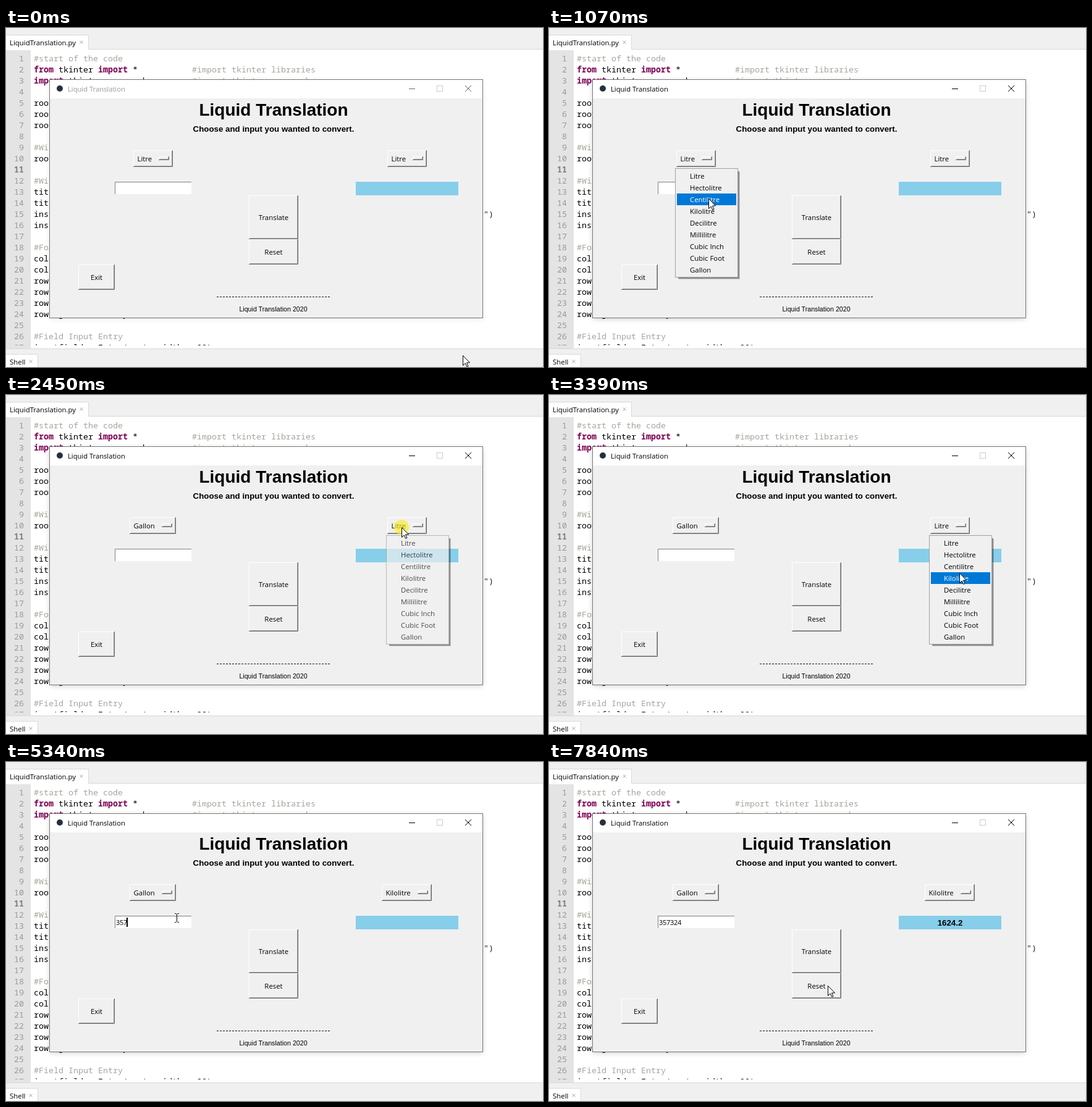
Animation of 869x549 px, one loop 8000 ms. Source, as an HTML page:

```html
<!DOCTYPE html>
<html lang="en">
<head>
<meta charset="utf-8">
<title>Liquid Translation</title>
<style>
  html, body { margin: 0; width: 100%; height: 100%; overflow: hidden; background: #f0f0f0; }
  svg { display: block; width: 100vw; height: 100vh; }
  text { white-space: pre; }
  .ui { font: 11.4px "Open Sans", "Noto Sans", sans-serif; }
  .code { font: 13.33px "Noto Sans Mono", "DejaVu Sans Mono", monospace; }
  .arial { font-family: "Liberation Sans", Arial, sans-serif; }
  .b { font-weight: 700; }
  .mid { text-anchor: middle; }
  .end { text-anchor: end; }
</style>
</head>
<body>
<svg id="stage" viewBox="0 0 869 549" xmlns="http://www.w3.org/2000/svg"></svg>
<script>
const LOOP = 8000, STEP = 77.5;
const UNITS = ["Litre", "Hectolitre", "Centilitre", "Kilolitre", "Decilitre",
  "Millilitre", "Cubic Inch", "Cubic Foot", "Gallon"];
const ROW = 19, ROW_TOP = 230;
const COMMENT = "#a6a69c";

const esc = s => s.replace(/&/g, "&amp;").replace(/</g, "&lt;");
const rect = (x, y, w, h, fill, more = "") =>
  `<rect x="${x}" y="${y}" width="${w}" height="${h}" fill="${fill}" ${more}/>`;
const text = (x, y, s, cls = "ui", fill = "#000", more = "") =>
  `<text x="${x}" y="${y}" class="${cls}" fill="${fill}" ${more}>${esc(s)}</text>`;
const line = (d, stroke, w = 1, more = "") =>
  `<path d="${d}" fill="none" stroke="${stroke}" stroke-width="${w}" ${more}/>`;
const cross = (x, y, r, stroke) =>
  line(`M${x - r} ${y - r}L${x + r} ${y + r}M${x + r} ${y - r}L${x - r} ${y + r}`, stroke);

// Bevelled box with a light and a dark edge
function bevel(x, y, w, h, sunken = false) {
  const [lit, dark] = sunken ? ["#696969", "#fff"] : ["#fff", "#696969"];
  return rect(x, y, w, h, "#f0f0f0") +
    line(`M${x + .5} ${y + h}V${y + .5}H${x + w}`, lit) +
    line(`M${x + 1.5} ${y + h - 1.5}H${x + w - 1.5}V${y + 1}`, sunken ? "#e3e3e3" : "#a0a0a0") +
    line(`M${x} ${y + h - .5}H${x + w - .5}V${y}`, dark);
}

function button(x, y, w, h, label, sunken = false) {
  const d = sunken ? 1 : 0;
  return bevel(x, y, w, h, sunken) + text(x + w / 2 + d, y + h / 2 + 4.5 + d, label, "ui mid");
}

function picker(x, w, label) {
  return bevel(x, 198, w, 27) + text(x + 6.5, 216, label) + bevel(x + w - 23, 208, 17, 6);
}

function editor() {
  const baseline = n => 36 + 18 * n;
  const code = (n, s, fill = "#000", col = 0, cls = "code") =>
    text(45 + col * 8, baseline(n), s, cls, fill);
  const keyword = (n, s, col = 0) => code(n, s, "#7f0055", col, "code b");

  let numbers = "";
  for (let n = 1; n <= 27; n++)
    numbers += text(29, baseline(n), String(n), n === 11 ? "code b end" : "code end", n === 11 ? "#808080" : "#999");

  const plain = { 5: "root = Tk()", 6: "root", 7: "root", 10: "root", 13: "title", 14: "title",
    15: "instr", 16: "instr", 19: "col=0", 20: "col1", 21: "row=0", 22: "row1", 23: "row2",
    24: "row2.grid(1, sticky=N, row = 02)", 27: "inputfield = Entry(root, width = 20)" };
  const notes = { 1: "#start of the code", 9: "#Window", 12: "#Window", 18: "#Format", 26: "#Field Input Entry" };

  return rect(0, 0, 869, 549, "#f0f0f0") + rect(0, 34, 869, 486, "#d9d9d9") +
    rect(0, 35, 869, 484, "#fff") + rect(0, 35, 40, 484, "#e4e4e4") +
    rect(0, 11, 133, 25, "#fff") + line("M0 11.5H133.5V34", "#d9d9d9") +
    text(6, 27.5, "LiquidTranslation.py") + cross(122, 23, 2.5, "#aaa") +
    `<clipPath id="page"><rect y="35" width="869" height="479"/></clipPath><g clip-path="url(#page)">` +
    numbers +
    Object.entries(plain).map(([n, s]) => code(n, s)).join("") +
    Object.entries(notes).map(([n, s]) => code(n, s, COMMENT)).join("") +
    keyword(2, "from") + code(2, "tkinter", "#000", 5) + keyword(2, "import", 13) + code(2, "*", "#000", 20) +
    code(2, "#import tkinter libraries", COMMENT, 32) +
    keyword(3, "import") + code(3, "tkinter.messagebox", "#000", 7) +
    code(3, "#import tkinter messagebox", COMMENT, 32) +
    code(15, '")', "#222", 91) + "</g>" +
    rect(0, 528, 51, 21, "#fff") + line("M0 528.5H51.5V549", "#d9d9d9") +
    text(6, 545, "Shell") + cross(40, 540, 2.5, "#aaa");
}

function frame() {
  return `<rect id="shade" x="71" y="86" width="700" height="385" filter="url(#blur)"/>` +
    rect(70.5, 83.5, 701, 386, "#f0f0f0", 'stroke="#767676"') + rect(71, 84, 700, 30, "#fff") +
    `<circle cx="87" cy="98" r="5" fill="#26303c"/>` +
    `<g id="caption"></g>` + rect(697.5, 93.5, 9, 9, "none", 'stroke="#ccc"') +
    text(433, 142, "Liquid Translation", "arial b mid", "#000", 'font-size="28"') +
    text(433, 168, "Choose and input you wanted to convert.", "arial b mid", "#000", 'font-size="13.3"') +
    rect(176, 249, 124, 20, "#fff") + line("M176.5 269V249.5H300", "#808080") +
    rect(566, 249, 166, 22, "#87ceeb") +
    button(393, 342, 80, 41, "Reset") + button(117, 383, 59, 41, "Exit") +
    line("M341 435.5H524", "#000", 1, 'stroke-dasharray="3 2"') +
    text(432.5, 459, "Liquid Translation 2020", "arial mid", "#000", 'font-size="10.67"');
}

const stage = document.getElementById("stage");
stage.innerHTML = `<defs><filter id="blur" x="-10%" y="-10%" width="120%" height="120%">
  <feGaussianBlur stdDeviation="4"/></filter></defs>` + editor() + frame() + `<g id="live"></g>`;
const [shade, caption, live] = ["shade", "caption", "live"].map(id => document.getElementById(id));

// Pointer: time, x, y
const PATH = [
  [0, 739, 530], [70, 739, 530], [750, 238, 219], [900, 238, 219], [1070, 258, 276],
  [1680, 257, 384], [1850, 257, 384], [2370, 640, 214], [2540, 640, 214], [2680, 640, 224],
  [2770, 641, 226], [3390, 664, 288], [3480, 663, 289], [3760, 663, 289], [4250, 321, 251],
  [4440, 276, 252], [6130, 276, 252], [6500, 446, 304], [6590, 451, 312], [7370, 451, 312],
  [7680, 451, 362], [LOOP, 451, 362]
];
const PRESSES = [[760, 900], [1760, 1910], [2360, 2620], [3620, 3770], [4470, 4640], [6590, 6730]];
const CARET = [[4470, 5100], [5340, 5960], [6270, 6890], [7210, 7840]];
const TYPED = [[4950, 1], [5110, 2], [5340, 3], [5890, 6]];
const MENUS = [{ x: 204, label: 228, open: 770, shut: 1915 }, { x: 615, label: 639, open: 2370, shut: 3775 }];

const within = (spans, t) => spans.some(([a, b]) => t >= a && t < b);

function pointerAt(t) {
  const i = Math.max(1, PATH.findIndex(p => p[0] > t));
  const [a, b] = [PATH[i - 1], PATH[i]];
  const u = (t - a[0]) / (b[0] - a[0]), e = u * u * (3 - 2 * u);
  return [1, 2].map(k => Math.round(a[k] + (b[k] - a[k]) * e));
}

function menu(m, t, px, py) {
  if (t < m.open || t >= m.shut) return "";
  const alpha = Math.min(1, (t - m.open) / 160);
  const row = Math.floor((py - ROW_TOP) / ROW);
  const hot = alpha === 1 && px > m.x && px < m.x + 102 ? row : -1;
  const rows = UNITS.map((unit, i) => {
    const y = ROW_TOP + i * ROW, on = i === hot;
    return (on ? rect(m.x + 3, y, 96, ROW, "#0078d7") : "") +
      text(m.label, y + 14, unit, "ui", on ? "#fff" : "#000");
  }).join("");
  return line(`M${m.x + 5} 405H${m.x + 103}V232`, "rgba(0,0,0,.42)", 2) +
    line(`M${m.x + 6} 406.5H${m.x + 104.5}V233`, "rgba(0,0,0,.16)", 1) +
    `<g opacity="${alpha}">` + rect(m.x + .5, 227.5, 101, 176, "#f0f0f0", 'stroke="#a0a0a0"') + rows + "</g>";
}

function pointer(x, y) {
  const inEntry = x >= 176 && x < 300 && y >= 249 && y < 269;
  const shape = inEntry
    ? line("M-3 -6.5H-.5M1.5 -6.5H4M.5 -6V7M-3 7.5H-.5M1.5 7.5H4", "#000")
    : `<path d="M.5 .5V16.5L4.2 13L6.8 18.5L9 17.5L6.5 12H11.5Z" fill="#fff" stroke="#000"/>`;
  return `<g transform="translate(${x} ${y})">${shape}</g>`;
}

function draw(t) {
  const tick = Math.max(0, Math.floor((t + 34) / STEP) * STEP);
  const [x, y] = pointerAt(Math.min(tick, LOOP - 1));
  const active = t >= 770;

  shade.setAttribute("fill-opacity", active ? .2 : .1);
  const ink = active ? "#000" : "#666";
  caption.innerHTML =
    text(100, 103, "Liquid Translation", "ui", active ? "#000" : "#999", 'style="font-size:11.2px"') +
    line("M652 98.5H662", ink) + cross(748, 98, 5, ink);

  const typed = TYPED.reduce((n, [at, count]) => t >= at ? count : n, 0);
  const digits = [..."357324"].slice(0, typed)
    .map((d, i) => text(178 + 6 * i, 264, d, "ui", "#000", 'style="font-size:11px"')).join("");

  live.innerHTML =
    (t < 1915 ? picker(206, 64, "Litre") : picker(200, 75, "Gallon")) +
    (t < 3775 ? picker(617, 64, "Litre") : picker(608, 81, "Kilolitre")) +
    button(393, 271, 80, 71, "Translate", t >= 6590 && t < 6725) +
    digits + (within(CARET, t) ? rect(177 + 6 * typed, 252, 2, 15, "#000") : "") +
    (t >= 6725 ? text(649, 265, "1624.2", "arial b mid", "#000", 'font-size="13.3"') : "") +
    MENUS.map(m => menu(m, tick, x, y)).join("") +
    (within(PRESSES, t) ? `<circle cx="${x}" cy="${y}" r="12" fill="#fbec1e" opacity=".65"/>` : "") +
    pointer(x, y);
}

function loop() {
  draw(performance.now() % LOOP);
  requestAnimationFrame(loop);
}
loop();
</script>
</body>
</html>
```
